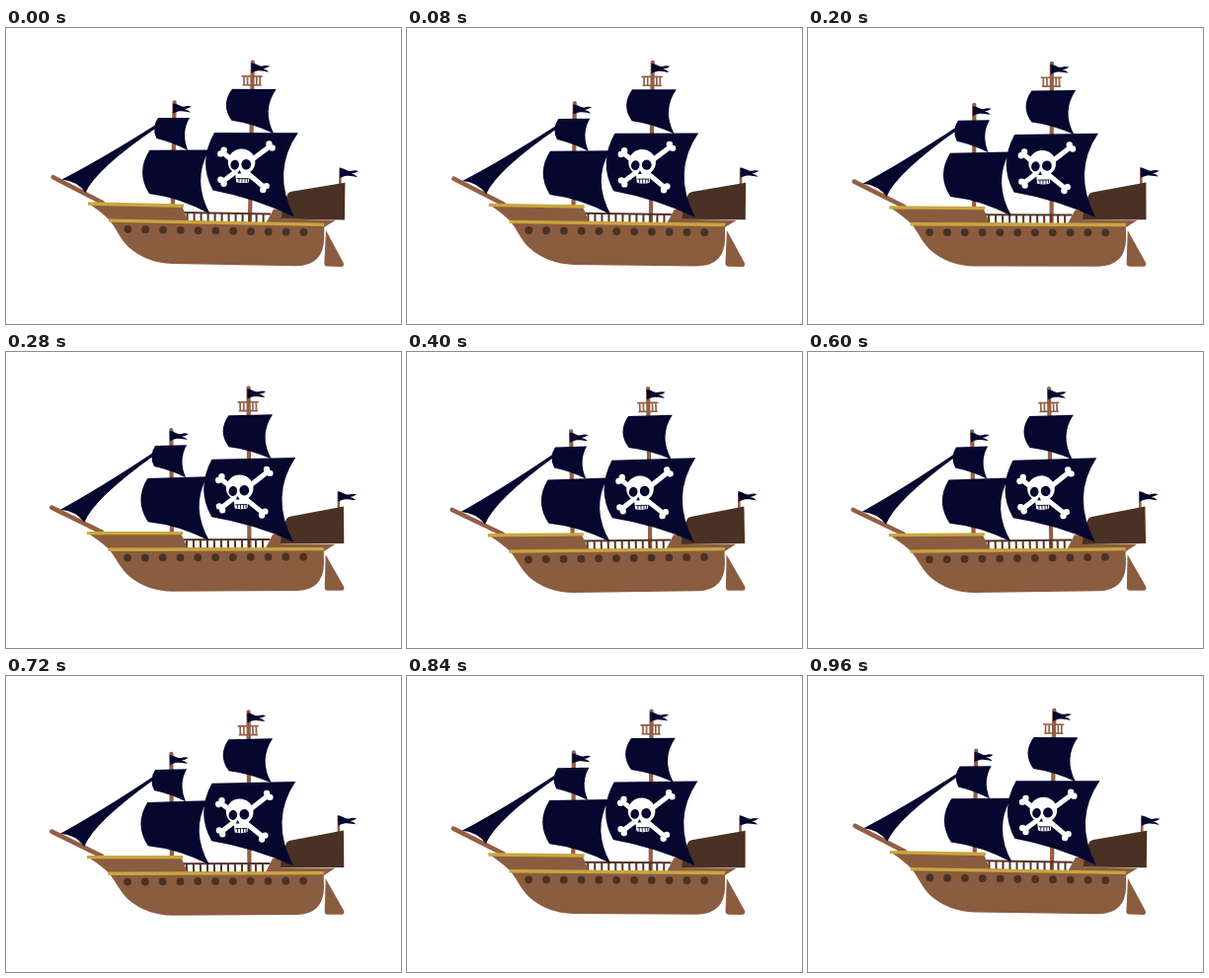
An HTML page that plays this animation: 400x300 px, repeating every 1000 ms.

```html
<!DOCTYPE html>
<html lang="en">
<head>
<meta charset="utf-8">
<title>Rocking pirate ship</title>
<style>
  html, body { margin: 0; width: 100%; height: 100%; overflow: hidden; background: #fff; }
  svg { display: block; width: 100vw; height: 100vh; }
  .wood { fill: #8b5d40; }
  .dark { fill: #4a3123; }
  .navy { fill: #06072f; }
  .bone { fill: #fff; }
  .spar { fill: none; stroke: #935f45; stroke-linecap: round; }
  .gold { fill: none; stroke: #c9a63f; stroke-width: 3.4; }
  .rail { fill: none; stroke: #543626; stroke-width: 2; }
</style>
</head>
<body>
<svg viewBox="0 0 400 300">
  <defs>
    <path id="flag" class="navy" d="M0-.4C5-.6 7 3.2 11.5 2.6Q15 1.4 19 2.6Q15.5 5 12 5.2Q15.5 5.8 18 8.6C12 8 8 5.6 0 9.6Z"/>
  </defs>
  <g id="ship">
    <path class="wood" d="M324 205L341.7 238Q342.8 241.8 339.3 242L325.3 241.6Q322.2 241.5 322.3 238.5Z"/>

    <g class="spar">
      <path stroke-width="4.2" d="M249.8 34.5L247 196M170.6 75.3L168.8 180"/>
      <path stroke-width="4.6" d="M47.8 151.2L98 177.3"/>
      <path stroke-width="2.6" d="M338.6 142.5L338.3 160"/>
      <path stroke-width="1.7" d="M239.2 48.8L259 49.1M240.2 57.6L258 57.9M241 49V57.5M244.6 49V57.5M253.8 49V57.5M257.2 49V57.5"/>
    </g>
    <use href="#flag" x="248.4" y="36"/>
    <use href="#flag" x="169" y="77"/>
    <use href="#flag" x="338" y="142.3"/>

    <path class="rail" d="M179 186.9L268 188.6"/>
    <g id="posts"></g>

    <path class="wood" d="M271 183.5L283 184L279 193.5L334 194.8L322 202L263 198Z"/>
    <path class="dark" d="M289 165.8L343.4 156.8L342.9 194.4L278.5 193.4C280 184 282 175 285 168.5Q286 166.3 289 165.8Z"/>
    <path class="wood" d="M84 178L178 180.4Q181 186 184 195L322.2 199.5V214Q321 241 294 241.2L168 239Q142 238 124 222C114 212 112 203 104 194Q97 187 84 178Z"/>
    <path class="gold" d="M83 178L180 180.2M104 195.1L322.3 199.4"/>
    <g id="ports" class="dark"></g>

    <g class="navy">
      <path d="M152.5 97.5Q98 132 56.5 153.5Q72 155 80.5 167Q91 143 152.5 101Z"/>
      <path d="M154 91L186 91Q177 106 184.2 124Q169 116 152.5 112Q147 101 154 91Z"/>
      <path d="M145.5 123.8L206 123.5Q188 154 206.6 188.5Q176 172 145 168Q131 146 145.5 123.8Z"/>
      <path d="M229 61.8L273.7 62Q259 83 271.2 107Q250 97 228.5 93.8Q217 78 229 61.8Z"/>
      <path d="M211 106L295.8 106.2Q268.5 145 291.8 191.5Q252 172.5 209.5 164.5Q194 136 211 106Z"/>
    </g>

    <g class="bone">
      <path d="M219.5 126L261.5 161.5M219.5 155.5L267.5 119.8" stroke="#fff" stroke-width="5"/>
      <g id="knobs"></g>
      <ellipse cx="238.6" cy="135.7" rx="13.8" ry="13.2"/>
      <path d="M231.8 144H247L246 156.2Q239.5 158 233.2 156.2Z"/>
    </g>
    <g class="navy">
      <ellipse cx="231.7" cy="138.7" rx="4.3" ry="5" transform="rotate(12 231.7 138.7)"/>
      <ellipse cx="243.2" cy="138.2" rx="4.9" ry="5.2"/>
      <path d="M236.4 143.8L238.2 147.4H234.3Z"/>
      <path d="M233.6 152.6H245.6M236 152.6V156.4M239 152.6V156.8M242 152.6V156.6M244.6 152.6V156" fill="none" stroke="#06072f" stroke-width=".9"/>
    </g>
  </g>
</svg>
<script>
  const byId = id => document.getElementById(id);

  function add(parent, tag, attrs) {
    const el = document.createElementNS('http://www.w3.org/2000/svg', tag);
    for (const key in attrs) el.setAttribute(key, attrs[key]);
    byId(parent).appendChild(el);
  }

  const dot = (parent, cx, cy, r) => add(parent, 'circle', { cx, cy, r });

  for (let i = 0; i < 11; i++) dot('ports', 123.4 + 17.8 * i, 203.9 + 0.31 * i, 3.9);

  for (let i = 0; i < 12; i++) {
    const x = 183.6 + 7 * i, y = 187.1 + 0.13 * i;
    add('posts', 'path', { class: 'rail', d: `M${x} ${y}v8.8` });
  }

  // Two lobes at each bone end, set across the bone's direction.
  for (const [x, y, dx, dy] of [
    [219, 125.5, 1.7, -1.9], [262, 162, 1.7, -1.9],
    [219, 155.8, 1.6, 2], [268, 119.5, 1.6, 2]
  ]) {
    dot('knobs', x + dx, y + dy, 3.2);
    dot('knobs', x - dx, y - dy, 3.2);
  }

  const LOOP = 1000, SWING = 1.93;
  const ease = x => x * (0.8 + x * (1.4 - 1.2 * x));

  function draw(time) {
    const phase = (time % LOOP) / LOOP;
    const x = 1 - Math.abs(1 - 2 * phase);
    byId('ship').setAttribute('transform', `rotate(${-SWING * ease(x)} 330 221)`);
  }

  const start = performance.now();
  function tick() {
    draw(performance.now() - start);
    requestAnimationFrame(tick);
  }
  tick();
</script>
</body>
</html>
```
